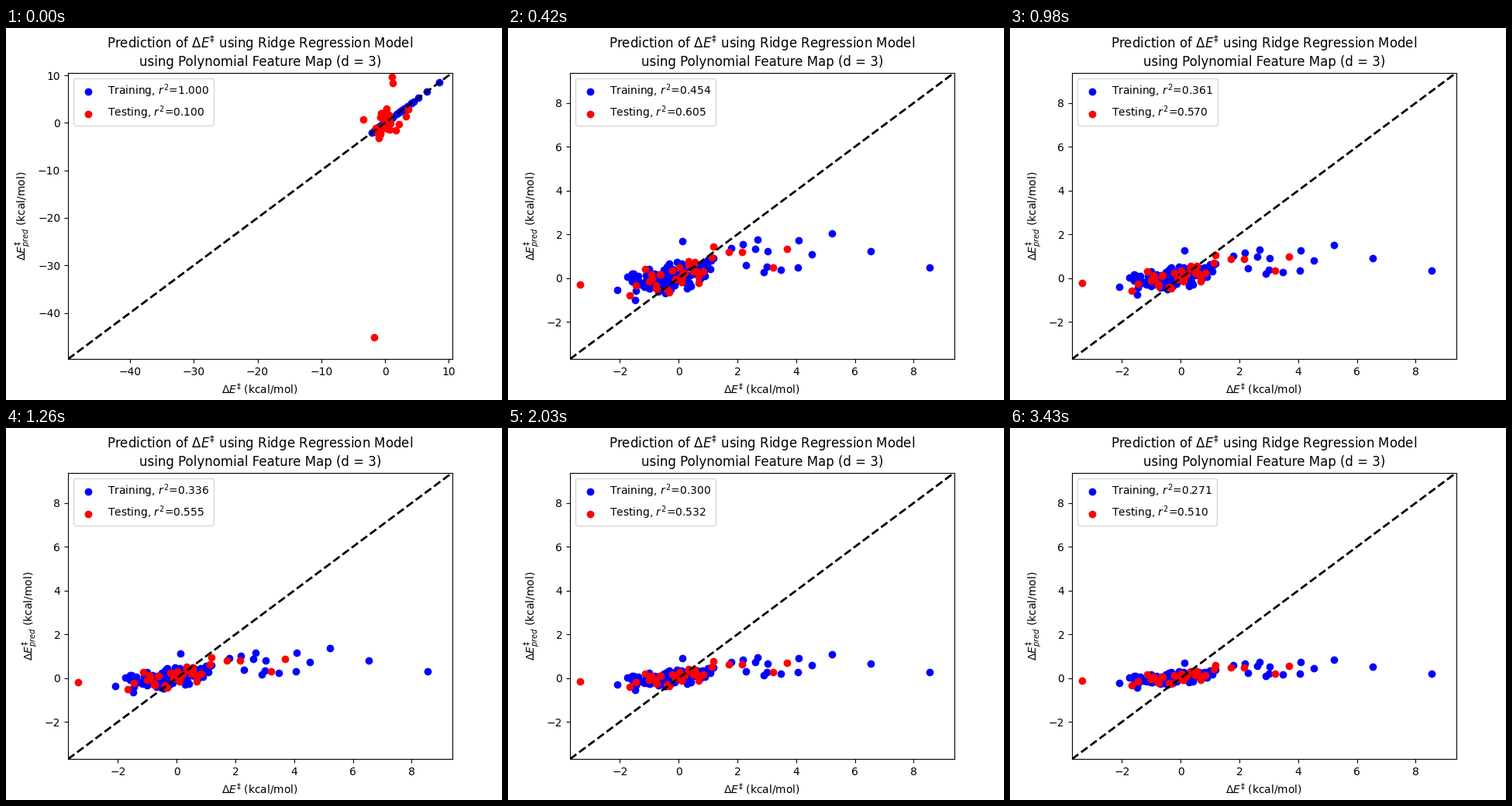
These frames come from a looping animation (640 by 480 pixels, 3570 ms). A matplotlib script:

```python
import numpy as np
import matplotlib.pyplot as plt
from matplotlib.animation import FuncAnimation

STEPS = 50          # regularisation strengths
FIRST, LAST = 6, STEPS - 1
SLOPE, OFFSET = .3, .1      # trend of the fit at step FIRST

rng = np.random.default_rng(4)


def core(count, low, mode, high):
    """Dense part of the cloud: true values and their fit at step FIRST."""
    x = rng.triangular(low, mode, high, count)
    noise = np.clip(rng.normal(0, .33, count), -.65, .65)
    return x, OFFSET + SLOPE * x + noise


# Isolated training points: true value, fit at step FIRST
tail_x, tail_fit = np.transpose([
    (8.536, .48), (6.54, 1.22), (5.23, 2.04), (4.54, 1.09), (4.09, 1.73),
    (4.06, .48), (3.48, .38), (3.03, 1.23), (3.00, .52), (2.90, .27),
    (2.69, 1.76), (2.61, 1.34), (2.29, .59), (2.19, 1.55), (1.79, 1.37),
    (.13, 1.69),
])
core_x, core_fit = core(130, -2.35, -.2, 1.5)
train_x = np.append(tail_x, core_x)
train_fit = np.append(tail_fit, core_fit)

# Isolated test points: true value, unregularised fit, fit at step FIRST
far_x, far_start, far_fit = np.transpose([
    (-3.364, .75, -.30), (-1.66, -45.2, -.78), (1.13, 9.6, .96),
    (1.18, 8.45, 1.44), (1.70, -1.5, 1.19), (2.17, -.2, 1.19),
    (3.22, 1.3, .48), (3.69, 2.9, 1.33),
])
core_x, core_fit = core(30, -1.9, -.7, 1.4)
test_x = np.append(far_x, core_x)
test_start = np.append(far_start, core_x + rng.normal(0, 1.7, core_x.size))
test_fit = np.append(far_fit, core_fit)

# Key points of the scores: step, training r2, testing r2
SCORES = np.transpose([
    (49, .271, .510), (38, .283, .520), (29, .300, .532), (23, .317, .543),
    (14, .361, .570), (6, .454, .605), (0, 1, .100),
])


def smooth(step, fit, stiffness=11, final=.42):
    """Ridge-like shrinkage from fit at FIRST to final * fit at LAST."""
    start, now, end = 1 / (np.array([FIRST, step, LAST]) + stiffness)
    return fit * (final + (1 - final) * (now - end) / (start - end))


def predict(step, start, fit, overfit_decay):
    overfit = start - smooth(0, fit)
    return smooth(step, fit) + overfit * overfit_decay ** step


def scores(step):
    steps, *curves = SCORES
    return [np.interp(1 / (step + 1), 1 / (steps + 1), curve) for curve in curves]


fig, ax = plt.subplots(figsize=(6.4, 4.8), dpi=100)


def draw(frame):
    step = min(frame, LAST)
    train_pred = predict(step, train_x, train_fit, .2)
    test_pred = predict(step, test_start, test_fit, .04)
    train_r2, test_r2 = scores(step)

    ax.clear()
    ax.scatter(train_x, train_pred, color="blue",
               label=f"Training, $r^2$={train_r2:.3f}")
    ax.scatter(test_x, test_pred, color="red",
               label=f"Testing, $r^2$={test_r2:.3f}")

    values = np.concatenate([train_x, train_pred, test_x, test_pred])
    limits = 1.1 * values.min(), 1.1 * values.max()
    ax.plot(limits, limits, "k--", lw=2)
    ax.set(xlim=limits, ylim=limits,
           xlabel="$\\Delta E^‡$ (kcal/mol)",
           ylabel="$\\Delta E^‡_{pred}$ (kcal/mol)")
    ax.set_title("Prediction of $\\Delta E^‡$ using Ridge Regression Model\n"
                 "using Polynomial Feature Map (d = 3)")
    ax.legend(loc="upper left")
    return []


# One extra frame holds the final state
anim = FuncAnimation(fig, draw, frames=STEPS + 1, init_func=lambda: [],
                     interval=70, repeat=True, repeat_delay=0)
plt.show()
```
